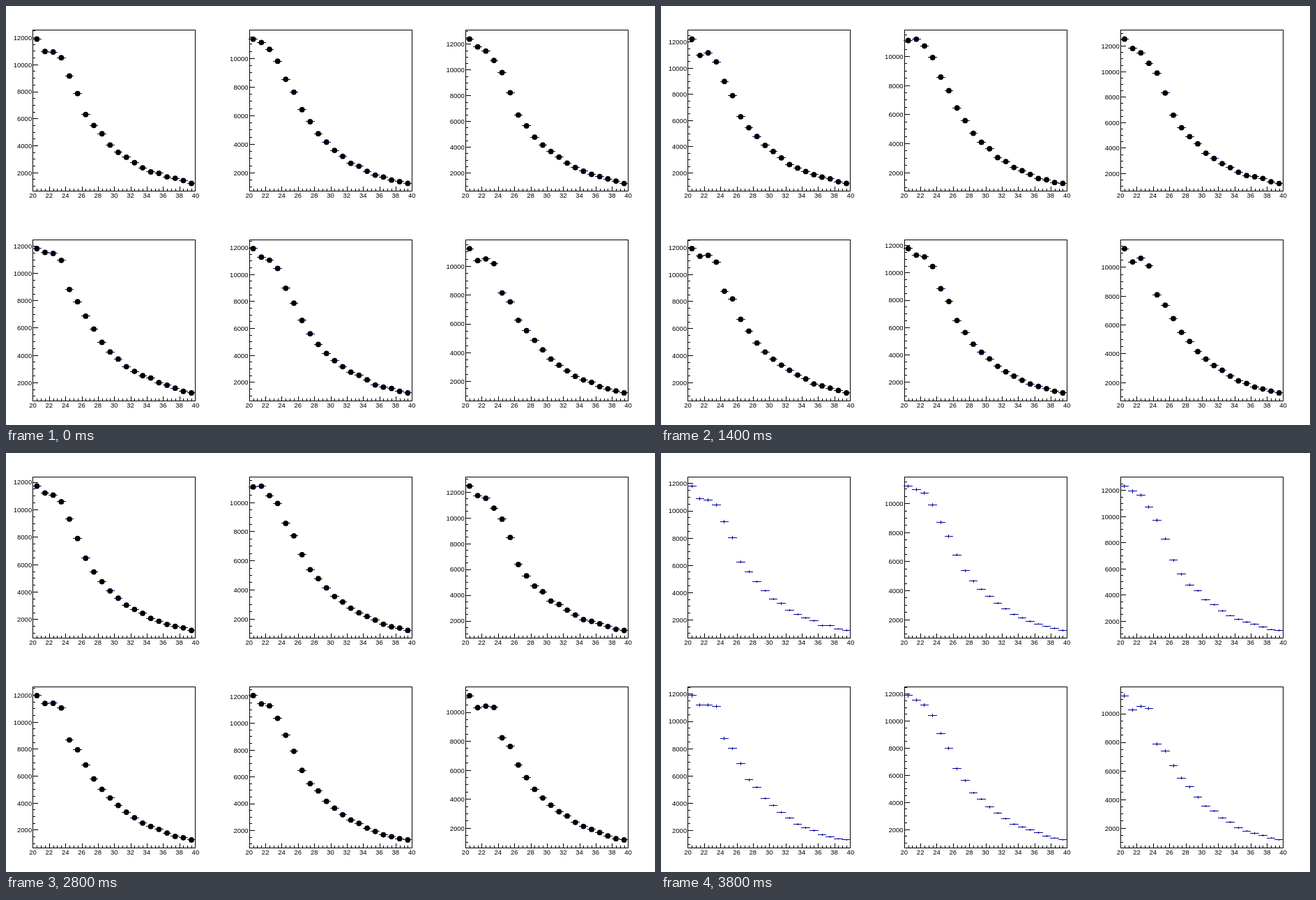
Recreate the animation shown at these times as an HTML page with a canvas. Size 931 by 601 pixels, loop 4 s.

```html
<!DOCTYPE html>
<html>
<head>
<meta charset="utf-8">
<style>
html, body { margin: 0; width: 100%; height: 100%; overflow: hidden; background: #fff; }
canvas { display: block; }
</style>
</head>
<body>
<canvas id="stage" width="931" height="601"></canvas>
<script>
const ctx = document.getElementById('stage').getContext('2d');
const STEP = 200, STEPS = 20, BLUE = '#000099', BLACK = '#000';
const PLOT_W = 233.4, PLOT_H = 230.8, BINS = 20;

// Mean counts of each panel at a few bins; an exponential tail follows the last one
const keyBins = [0, 1, 3, 4, 6];
const panels = [
  [11950, 11050, 10550, 9150, 6350],
  [11300, 11100, 9800, 8650, 6350],
  [12500, 11870, 10750, 9850, 6500],
  [11870, 11300, 11050, 8800, 6750],
  [11860, 11440, 10450, 8950, 6450],
  [11250, 10300, 10250, 8150, 6400]
];

function mean(keys, bin) {
  const last = keyBins.length - 1;
  if (bin >= keyBins[last]) {
    return 500 + (keys[last] - 500) * Math.exp(-0.16 * (bin - keyBins[last]));
  }
  const k = keyBins.findIndex(b => b > bin) - 1;
  const t = (bin - keyBins[k]) / (keyBins[k + 1] - keyBins[k]);
  return keys[k] + (keys[k + 1] - keys[k]) * t + 800 * t * (1 - t);
}

function seeded(seed) {
  return () => {
    seed = (seed + 0x6D2B79F5) | 0;
    let t = Math.imul(seed ^ (seed >>> 15), 1 | seed);
    t = (t + Math.imul(t ^ (t >>> 7), 61 | t)) ^ t;
    return ((t ^ (t >>> 14)) >>> 0) / 4294967296;
  };
}

function rect(x, y, w, h, color = BLACK) {
  ctx.fillStyle = color;
  ctx.fillRect(x, y, w, h);
}

function label(text, x, y, align) {
  ctx.fillStyle = BLACK;
  ctx.textAlign = align;
  ctx.fillText(text, x, y);
}

function drawPanel(step, panel) {
  const left = 38.48 + (panel % 3) * 931 / 3;
  const top = 34.86 + (panel > 2 ? 300.5 : 0);
  const bottom = top + PLOT_H;
  const x0 = Math.round(left), x1 = Math.floor(left + PLOT_W);
  const y0 = Math.floor(top), y1 = Math.floor(bottom);
  const binX = i => left + PLOT_W * i / BINS;
  const rand = seeded(step * 977 + panel * 131 + 7);
  const gauss = () => (rand() + rand() + rand() + rand() - 2) * 1.73;

  const counts = Array.from({ length: BINS }, (_, i) => {
    const n = mean(panels[panel], i);
    return n + gauss() * Math.sqrt(n);
  });
  const high = Math.max(...counts.map(n => n + Math.sqrt(n)));
  const low = Math.min(...counts.map(n => n - Math.sqrt(n)));
  const pad = (high - low) * 0.05;
  const scale = PLOT_H / (high - low + 2 * pad);
  const toY = n => bottom - (n - low + pad) * scale;

  // Frame
  rect(x0, y0, x1 - x0 + 1, 1);
  rect(x0, y1, x1 - x0 + 1, 1);
  rect(x0, y0, 1, y1 - y0 + 1);
  rect(x1, y0, 1, y1 - y0 + 1);

  // Axes
  for (let i = 0; i <= 40; i++) {
    const major = i % 4 === 0, h = major ? 7 : 4;
    rect(Math.min(Math.round(binX(i / 2)), x1), y1 - h + 1, 1, h);
    if (major) label(20 + i / 2, binX(i / 2), bottom + 9.5, 'center');
  }
  for (let n = Math.ceil((low - pad) / 500) * 500; n <= high + pad; n += 500) {
    const y = toY(n), major = n % 2000 === 0;
    rect(x0, Math.floor(y), major ? 8 : 4, 1);
    if (major) label(n, left - 1.3, y + 3.4, 'right');
  }

  // Error bars, with markers on every step but the last
  const markers = step < STEPS - 1;
  counts.forEach((n, i) => {
    const a = Math.floor(binX(i)), b = Math.min(Math.floor(binX(i + 1)), x1);
    const mid = binX(i + 0.5), y = toY(n), err = Math.sqrt(n) * scale;
    const from = Math.floor(y - err), to = Math.floor(y + err);
    const color = markers && rand() < 0.5 ? BLACK : BLUE;
    rect(a, Math.floor(y), b - a + 1, 1, color);
    rect(Math.floor(mid), from, 1, to - from + 1, color);
    if (markers) {
      ctx.fillStyle = BLACK;
      ctx.beginPath();
      ctx.arc(mid, y, 3.9, 0, 2 * Math.PI);
      ctx.fill();
    }
  });
}

let shown = -1;
function draw() {
  const step = Math.floor(performance.now() / STEP) % STEPS;
  if (step !== shown) {
    shown = step;
    rect(0, 0, 931, 601, '#fff');
    ctx.font = '9.5px "Liberation Sans", Arial, sans-serif';
    panels.forEach((_, panel) => drawPanel(step, panel));
  }
  requestAnimationFrame(draw);
}
draw();
</script>
</body>
</html>
```
